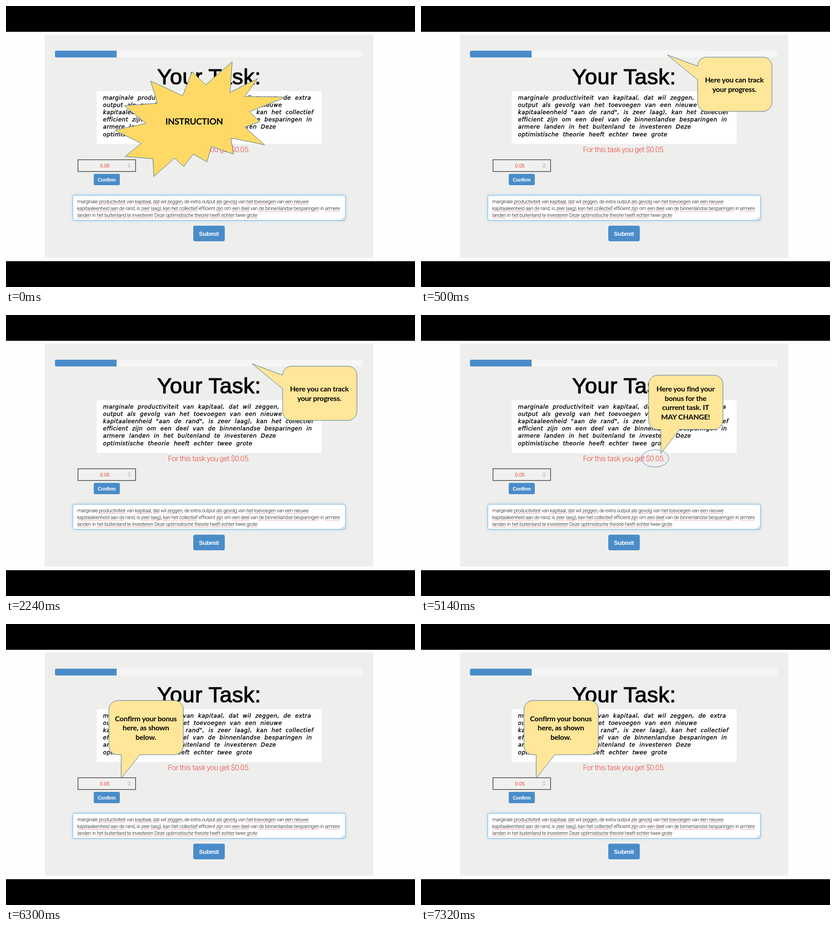
Animation, 902 px wide and 621 px high, one loop 8 s. Source, as an HTML page:

```html
<!DOCTYPE html>
<html lang="en">
<head>
<meta charset="utf-8">
<title>Task instructions</title>
<style>
  html, body { margin: 0; width: 100%; height: 100%; overflow: hidden; background: #000; }
  svg { position: absolute; left: 0; top: 0; }
  text { font-family: "Liberation Sans", Arial, sans-serif; text-anchor: middle; }
  .title { font-size: 48.5px; letter-spacing: .55px; stroke: #000; stroke-width: 1.2; }
  .hand text {
    font: oblique 12.5px "DejaVu Sans", sans-serif; letter-spacing: .5px; word-spacing: 4.5px;
    text-anchor: start; stroke: #000; stroke-width: .4;
  }
  .pay { font: 300 16.6px Roboto, sans-serif; letter-spacing: -.55px; fill: #ee3f3a; }
  .button { fill: #fff; font-weight: 700; }
  .note { fill: #ffe699; stroke: #41719c; }
  .label { font: 700 16px Lato, sans-serif; letter-spacing: -.23px; }
  #answer {
    position: absolute; left: 147px; top: 418px; width: 600px; height: 54px;
    border: 1px solid #72b3e8; border-radius: 4px; background: #fff;
    box-shadow: 0 0 6px #66afe980;
    font: 300 11px/15px Roboto, sans-serif; letter-spacing: -.29px; color: #111; white-space: nowrap;
  }
  #answer div { position: relative; left: 9px; top: 6px; }
  #answer u { text-decoration: underline dotted #e0403c 1.4px; text-underline-offset: 2px; text-decoration-skip-ink: none; }
</style>
</head>
<body>
<svg width="902" height="621">
  <path fill="#fdfefe" d="M0 57H902V564H0z"/>
  <path fill="#eeefed" d="M85.5 63H810V556H85.5z"/>
  <rect x="108" y="98.7" width="678" height="15" rx="3" fill="#f5f6f5"/>
  <path fill="#4a8cc9" d="M244 98.7H111a3 3 0 0 0-3 3v9a3 3 0 0 0 3 3H244z"/>
  <text class="title" x="447.8" y="173">Your Task:</text>
  <path fill="#fff" d="M200 188H696V305H200z"/>
  <g class="hand" id="hand"></g>
  <text class="pay" x="447.3" y="323">For this task you get $0.05.</text>

  <rect x="158.7" y="339.7" width="127" height="26" fill="#f0f1ef" stroke="#444" stroke-width="1.5"/>
  <text x="218" y="357" font-size="11" fill="#ee3f3a">0.05</text>
  <rect x="268.5" y="347.5" width="6" height="10" rx="3" fill="#fafafa" stroke="#ccc"/>
  <path fill="#666" d="M270 351.2l1.5-2 1.5 2zM270 354l1.5 2 1.5-2z"/>
  <rect x="193.5" y="371" width="57.5" height="25" rx="3" fill="#4a8cc9"/>
  <text class="button" x="222" y="388" font-size="11" letter-spacing="-.4">Confirm</text>
  <rect x="413" y="485.5" width="69.5" height="34.5" rx="4" fill="#4a8cc9"/>
  <text class="button" x="447.5" y="508" font-size="13.5" letter-spacing="-.3">Submit</text>

  <g class="scene">
    <path fill="#ffd966" stroke="#41719c" vector-effect="non-scaling-stroke"
      transform="translate(240 123) scale(.0175 .01176)"
      d="M11462 4342 14790 0 14525 5777 18007 3172 16380 6532 21600 6645 16985 9402 18270 11290
         16380 12310 18877 15632 14640 14350 14942 17370 12180 15935 11612 18842 9872 17370
         8700 19712 7527 18125 4917 21600 4805 18240 1285 17825 3330 15370 0 12877 3935 11592
         1172 8270 5372 7817 4502 3625 8550 6382 9722 1887z"/>
    <text class="label" x="415" y="262" style="font-size:19.5px;letter-spacing:-.4px">INSTRUCTION</text>
  </g>
  <g class="scene">
    <path class="note" d="M630 113h124a20 20 0 0 1 20 20v80a20 20 0 0 1-20 20H630a20 20 0 0 1-20-20V163L543 108 610 133a20 20 0 0 1 20-20z"/>
    <g class="lines" data-x="691" data-y="169">Here you can track|your progress.</g>
  </g>
  <g class="scene">
    <ellipse cx="516" cy="317" rx="30" ry="19" fill="none" stroke="#4f81b0"/>
    <path class="note" d="M522 133h124a20 20 0 0 1 20 20v80a20 20 0 0 1-20 20H570.3L529 306V253H522a20 20 0 0 1-20-20v-80a20 20 0 0 1 20-20z"/>
    <g class="lines" data-x="583.5" data-y="169">Here you find your|bonus for the|current task. IT|MAY CHANGE!</g>
  </g>
  <g class="scene">
    <path class="note" d="M247 169h124a20 20 0 0 1 20 20v80a20 20 0 0 1-20 20H295.3L254 341V289H247a20 20 0 0 1-20-20v-80a20 20 0 0 1 20-20z"/>
    <g class="lines" data-x="308.5" data-y="214.5">Confirm your bonus|here, as shown|below.</g>
  </g>
</svg>
<div id="answer"></div>
<svg width="902" height="621"><path d="M740 473l7-7M744 473l3-3" stroke="#888"/></svg>

<script>
const handwriting = `marginale productiviteit van kapitaal, dat wil zeggen, de extra
output als gevolg van het toevoegen van een nieuwe
kapitaaleenheid "aan de rand", is zeer laag), kan het collectief
efficient zijn om een deel van de binnenlandse besparingen in
armere landen in het buitenland te investeren Deze
optimistische theorie heeft echter twee grote`;

// Words between underscores carry a spelling mark.
const typed = `marginale _productiviteit_ van _kapitaal_, _dat_ wil _zeggen_, de extra output _als_ _gevolg_ van _het_ _toevoegen_ van _een_ _nieuwe_
_kapitaaleenheid_ _aan_ _de_ rand, is _zeer_ _laag_), _kan_ _het_ _collectief_ efficient _zijn_ om _een_ _deel_ van _de_ _binnenlandse_ _besparingen_ in _armere_
_landen_ in _het_ _buitenland_ _te_ _investeren_ _Deze_ _optimistische_ _theorie_ _heeft_ _echter_ twee _grote_`;

const textLines = (lines, x, y, step, cls = "") => lines.map((line, i) =>
  `<text class="${cls}" x="${x}" y="${y + i * step}">${line}</text>`).join("");

document.getElementById("hand").innerHTML = textLines(handwriting.split("\n"), 214, 207, 16.1);
document.getElementById("answer").innerHTML = typed.split("\n")
  .map(line => `<div>${line.replace(/_(.+?)_/g, "<u>$1</u>")}</div>`).join("");
for (const g of document.querySelectorAll(".lines"))
  g.innerHTML = textLines(g.textContent.split("|"), g.dataset.x, +g.dataset.y, 20.5, "label");

const starts = [0, 500, 3400, 6300], loop = 8000;
const scenes = document.querySelectorAll(".scene");

function draw() {
  const t = performance.now() % loop;
  const current = starts.findLastIndex(start => t >= start);
  scenes.forEach((scene, i) => scene.style.display = i === current ? "" : "none");
  requestAnimationFrame(draw);
}
draw();
</script>
</body>
</html>
```
